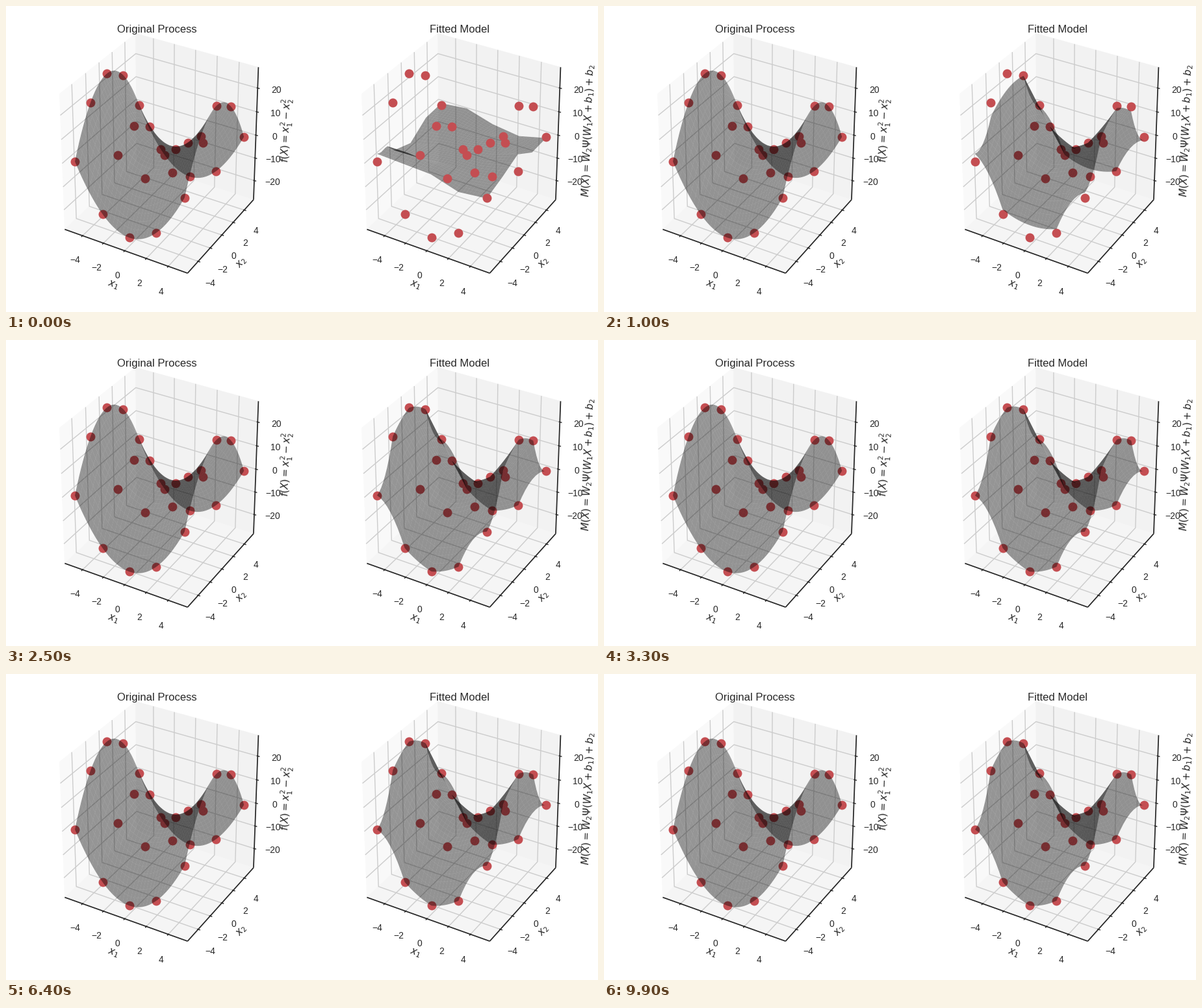
A matplotlib script for the animation above (10000 ms loop, 911 by 472 pixels).

```python
import numpy as np
import matplotlib.pyplot as plt
from matplotlib.animation import FuncAnimation
from matplotlib.collections import LineCollection, PolyCollection

W, H, DPI = 911, 472, 100
FRAMES, INTERVAL = 100, 100
AX_W, AX_H, AX_LEFT, AX_TOP, GAP = 387.5, 423.5, 39, 14.6, 465
INK, RED = "0.15", "#C44E52"
PANE = 0.5 + 1 / 48          # half size of the box in unit-cube coordinates
LIMS = np.array([11, 11, 55])
DELTA = 1 / 12
PER_POINT = 48 / ((AX_W + AX_H) * 72 / DPI)

plt.rcParams["font.family"] = "Liberation Sans"
plt.rcParams["axes.unicode_minus"] = True

# camera at azimuth -60, elevation 30, distance 10
az, el = np.radians([-60, 30])
NORMAL = np.array([np.cos(az) * np.cos(el), np.sin(az) * np.cos(el), np.sin(el)])
RIGHT = np.array([-np.sin(az), np.cos(az), 0])
UP = np.cross(NORMAL, RIGHT)


def project(p, shift=0):
    """Unit-cube points (..., 3) to pixel points (..., 2) and depth."""
    p = np.asarray(p, float)
    depth = 10 - p @ NORMAL
    x = AX_LEFT + shift + (0.095 + p @ RIGHT / depth) / 0.185 * AX_W
    y = AX_TOP + (0.09 - p @ UP / depth) / 0.185 * AX_H
    return np.stack([x, y], -1), depth


def saddle(x, y):
    return x ** 2 - y ** 2


NODES = np.linspace(-5, 5, 5)
NX, NY = np.meshgrid(NODES, NODES, indexing="ij")
TARGET = saddle(NX, NY)
GX, GY = np.meshgrid(*[np.linspace(-5, 5, 33)] * 2, indexing="ij")

# untrained heights at the nodes, and the error left after one second
START = np.array([
    [3.3, -1.5, -4.6, 0.5, 0.9],
    [2.7, -1.2, -2.0, 1.0, 2.0],
    [2.1, 0.0, 0.0, 0.0, -1.5],
    [-1.5, 0.0, 1.5, 2.5, -3.2],
    [-0.3, 2.0, 5.0, -0.5, -0.5]])
LATE = np.array([
    [3.3, -5.8, -6.6, -0.3, -0.5],
    [2.0, 0.0, 0.0, 0.0, 0.0],
    [5.5, 1.0, 0.0, 0.0, 3.5],
    [1.6, 0.0, 0.0, 0.0, 0.0],
    [2.1, -0.5, -1.0, -2.0, -1.4]])

# hat functions for bilinear interpolation between nodes
HATS = np.clip(1 - np.abs(GX[:, :1] - NODES) / 2.5, 0, 1)


def bump(s):
    h = (s / 2.5) % 1
    return 6.25 * h * (1 - h)


def stiffness(s, other):
    return 3 * (np.abs(s) > 2.5) * np.abs(other / 5) ** 3 - 0.5


WIGGLE = bump(GX) * stiffness(GX, GY) - bump(GY) * stiffness(GY, GX)
RIDGE = 2.4 * np.clip((1 - GX) / 4, 0, 1) * np.clip(1 - np.abs(GY + 3.5), 0, 1)


def model(t):
    """Surface of the network after t seconds of training."""
    if t < 1:
        end = np.exp(-1 / 0.45)
        w = (np.exp(-t / 0.45) - end) / (1 - end)
        error = w * (START - TARGET) + (1 - w) * LATE
    else:
        error = LATE * np.exp(-(t - 1) / 0.35)
    z = HATS @ (TARGET + error) @ HATS.T
    return z + (1 - np.exp(-t / 0.5)) * WIGGLE + np.exp(-t / 0.15) * RIDGE


def quads(z, shift):
    pts, depth = project(np.stack([GX, GY, z], -1) / LIMS, shift)
    q = np.stack([pts[:-1, :-1], pts[1:, :-1], pts[1:, 1:], pts[:-1, 1:]], 2)
    return q.reshape(-1, 4, 2), depth.min()


fig = plt.figure(figsize=(W / DPI, H / DPI), dpi=DPI, facecolor="white")
ax = fig.add_axes([0, 0, 1, 1])
ax.set(xlim=(0, W), ylim=(H, 0))
ax.axis("off")


def lines(segments, color, width, z):
    ax.add_collection(LineCollection(segments, colors=color, linewidths=width,
                                     zorder=z), autolim=False)


def axis(index, ticks, base, out, bends, tick_dir, label, shift):
    """One axis: grid, edge line, ticks, tick labels and a title.

    base: a point on the edge, out: signs pointing away from the box,
    bends: two further corners that the grid lines pass through.
    """
    base, out = np.array(base, float) * PANE, np.array(out, float)

    def at(value, p):
        p = np.array(p, float)
        p[index] = value
        return p

    grid, marks = [], []
    for v in ticks:
        u = v / LIMS[index]
        path = [at(u, base)] + [at(u, np.array(b) * PANE) for b in bends]
        grid.append(project(path, shift)[0])
        step = np.zeros(3)
        step[tick_dir] = out[tick_dir] * DELTA
        spot = at(u, base)
        marks.append(project([spot - 0.1 * step, spot + 0.2 * step], shift)[0])
        pos = project(spot + out * 15 * PER_POINT * DELTA, shift)[0]
        ax.text(*pos, f"{v}".replace("-", "\u2212"), size=10, color=INK,
                ha="center", va="top", zorder=6)
    edge = project([at(-PANE, base), at(PANE, base)], shift)[0]
    lines(grid, "0.8", 1, 1.2)
    lines([edge], INK, 1.25, 1.3)
    lines(marks, INK, 1, 1.3)
    dx, dy = edge[1] - edge[0]
    angle = np.degrees(np.arctan2(-dy, dx)) % 180
    angle -= 180 * (angle > 90)
    pos = project(at(0, base) + out * 25 * PER_POINT * DELTA, shift)[0]
    ax.text(*pos, label, size=11, color=INK, ha="center", va="center",
            rotation=angle, rotation_mode="anchor", zorder=6)


def panel(title, z_label, shift):
    a = PANE
    panes = [
        ([(-a, -a, -a), (-a, a, -a), (-a, a, a), (-a, -a, a)], 0.975),
        ([(-a, a, -a), (a, a, -a), (a, a, a), (-a, a, a)], 0.95),
        ([(-a, -a, -a), (a, -a, -a), (a, a, -a), (-a, a, -a)], 0.9625)]
    for corners, gray in panes:
        ax.add_patch(plt.Polygon(project(corners, shift)[0], fc=str(gray),
                                 ec=str(gray), lw=0.3, zorder=1))
    small, big = range(-4, 5, 2), range(-20, 21, 10)
    axis(0, small, (0, -1, -1), (0, -1, -1), [(0, 1, -1), (0, 1, 1)], 1,
         "$x_1$", shift)
    axis(1, small, (1, 0, -1), (1, 0, -1), [(-1, 0, -1), (-1, 0, 1)], 0,
         "$x_2$", shift)
    axis(2, big, (1, 1, 0), (1, 1, 0), [(-1, 1, 0), (-1, -1, 0)], 0,
         z_label, shift)
    ax.text(AX_LEFT + shift + AX_W / 2, 40.7, title, size=12, color=INK,
            ha="center", va="baseline", zorder=6)

    data = np.stack([NX, NY, TARGET], -1).reshape(-1, 3) / LIMS
    pts, depth = project(data, shift)
    dots = ax.scatter(*pts.T, s=100, color=RED, linewidths=0, zorder=2)
    surface = PolyCollection(quads(saddle(GX, GY), shift)[0],
                             facecolors=(0, 0, 0, 0.4), edgecolors="none",
                             linewidths=0, zorder=3)
    ax.add_collection(surface, autolim=False)
    return surface, dots, depth.min()


panel("Original Process", r"$f(X) = x_1^2 - x_2^2$", 0)
fitted, dots, dots_depth = panel(
    "Fitted Model", r"$M(X) = W_2 \Psi (W_1 X + b_1) + b_2$", GAP)


def update(i):
    verts, near = quads(model(i * INTERVAL / 1000), GAP)
    fitted.set_verts(verts)
    # whichever reaches closest to the viewer is painted last
    dots.set_zorder(2 if near < dots_depth else 4)
    return fitted, dots


anim = FuncAnimation(fig, update, frames=FRAMES, interval=INTERVAL,
                     repeat=True, repeat_delay=0, blit=False)
plt.show()
```
